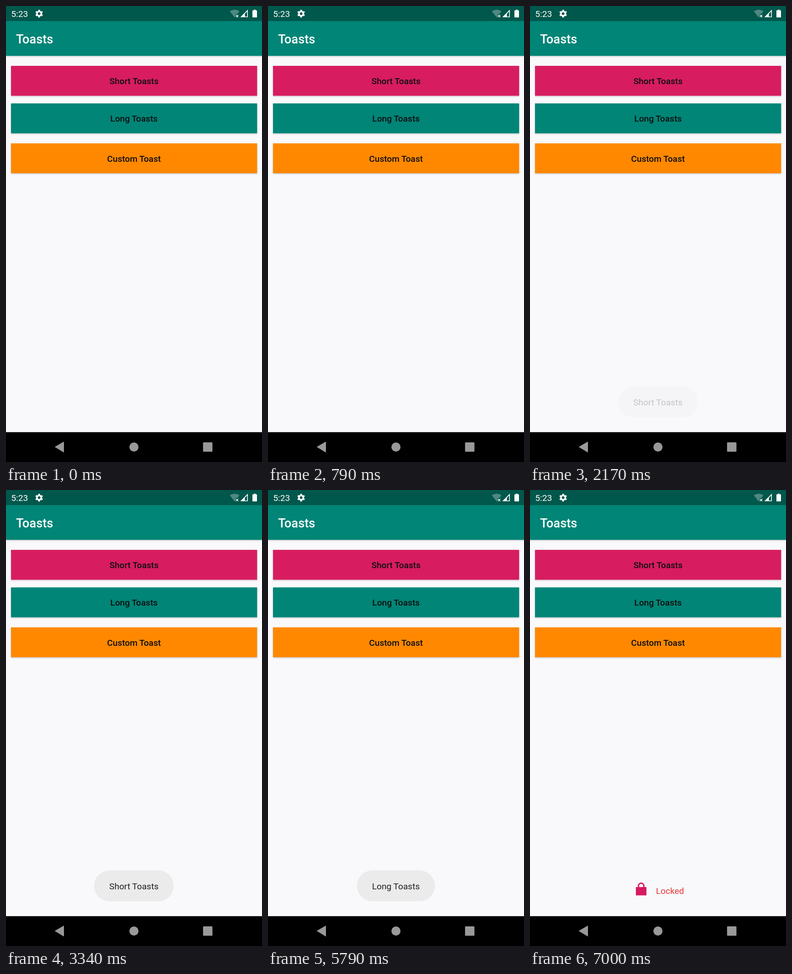
Write an HTML page that moves like this. It is 561 px wide and 998 px high and loops after 7.04 s.

```html
<!DOCTYPE html>
<html lang="en">
<head>
<meta charset="utf-8">
<title>Toasts</title>
<style>
  html, body { margin: 0; width: 100%; height: 100%; overflow: hidden; background: #f9f9fb; }
  svg { display: block; width: 100vw; height: 100vh; font: 19.1px Roboto, sans-serif; }
  .label { font-weight: 500; text-anchor: middle; fill: #0d0d0d; }
  .toast { opacity: 0; }
  .pill { fill: #ebebec; }
  .message { text-anchor: middle; fill: #202020; }
</style>
</head>
<body>
<svg viewBox="0 0 561 998">
  <defs>
    <filter id="shadow" x="-5%" y="-20%" width="110%" height="150%">
      <feDropShadow dx="0" dy="1.4" stdDeviation="1.5" flood-color="#000" flood-opacity=".24"/>
    </filter>
  </defs>
  <rect width="561" height="998" fill="#f9f9fb"/>

  <rect y="33" width="561" height="76" fill="#008577" filter="url(#shadow)"/>
  <rect width="561" height="33" fill="#00574b"/>
  <text x="22" y="81.5" font-size="27.3" font-weight="500" fill="#fff">Toasts</text>

  <g fill="#fff">
    <text x="11.3" y="24">5:23</text>
    <g fill="none" stroke="#fff">
      <circle cx="72.6" cy="16.7" r="4.7" stroke-width="3.6"/>
      <circle cx="72.6" cy="16.7" r="7.1" stroke-width="2.8" pathLength="12" stroke-dasharray="1 1" stroke-dashoffset="-.5"/>
    </g>
    <path d="M490.5 11.5Q501 4.5 511.5 11.5L507 17.5H503V23L501 25Z" opacity=".3"/>
    <path d="M504 19.5L509 24.5M509 19.5L504 24.5" stroke="#fff" stroke-width="1.5"/>
    <path fill-rule="evenodd" d="M530 8V24.5H513.5ZM528.4 12L523.5 17V23H528.4Z"/>
    <path d="M543 8H547V9.6H549Q550 9.6 550 10.6V24Q550 25 549 25H541Q540 25 540 24V10.6Q540 9.6 541 9.6H543Z"/>
  </g>

  <g id="buttons"></g>

  <g class="toast">
    <rect class="pill" x="193" y="832.5" width="174.5" height="67.5" rx="33.7"/>
    <text class="message" x="280.3" y="873.7">Short Toasts</text>
  </g>
  <g class="toast">
    <rect class="pill" x="194.8" y="832.5" width="171" height="67.5" rx="33.7"/>
    <text class="message" x="280.3" y="873.7">Long Toasts</text>
  </g>
  <g class="toast">
    <rect x="232" y="869" width="23.2" height="18.2" fill="#d81b60"/>
    <path d="M237.7 870V866.4A5.9 5.9 0 0 1 249.5 866.4V870" fill="none" stroke="#d81b60" stroke-width="2.9"/>
    <text x="276" y="883.5" fill="#e53935">Locked</text>
  </g>

  <rect y="932.7" width="561" height="65.3" fill="#000"/>
  <g fill="#999">
    <path d="M107.5 965L126.5 954V976.5Z" stroke="#999" stroke-linejoin="round"/>
    <circle cx="280.4" cy="965.3" r="10"/>
    <rect x="431.8" y="955" width="20.6" height="20.6" rx="1.5"/>
  </g>
</svg>
<script>
  const LOOP = 7040;
  const FADE = 400;
  const presses = [2120, 4010, 6250];
  const toasts = document.querySelectorAll('.toast');

  const button = (label, y, color) => `
    <rect x="11" y="${y}" width="539.3" height="65.4" fill="${color}" filter="url(#shadow)"/>
    <text class="label" x="280.5" y="${y + 40}">${label}</text>`;

  document.getElementById('buttons').innerHTML =
    button('Short Toasts', 131, '#d81b60') +
    button('Long Toasts', 213.2, '#008577') +
    button('Custom Toast', 300.6, '#ff8800');

  const progress = (time, start) => Math.min(1, Math.max(0, (time - start) / FADE));
  const fadeIn = u => 1 - (1 - u) ** 2;
  const fadeOut = u => 1 - u ** 2;

  // Each press shows its toast while the previous one fades away.
  function render(time) {
    toasts.forEach((toast, i) => {
      const end = presses[i + 1] ?? LOOP;
      toast.style.opacity = fadeIn(progress(time, presses[i])) * fadeOut(progress(time, end));
    });
  }

  const start = performance.now();
  function tick() {
    render((performance.now() - start) % LOOP);
    requestAnimationFrame(tick);
  }
  tick();
</script>
</body>
</html>
```
